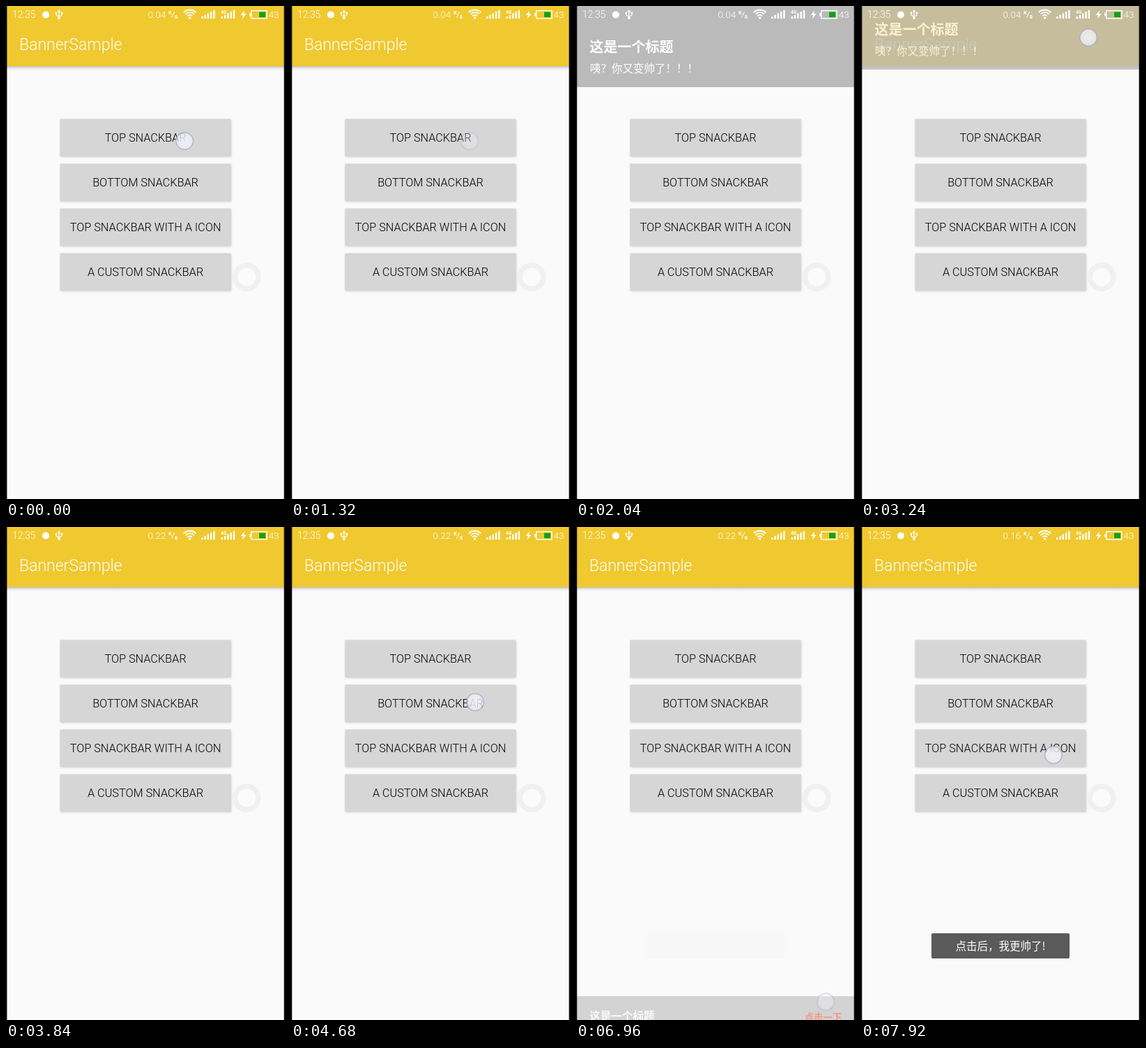
An HTML page with a canvas that plays this animation: 400x705 px, repeating every 8000 ms.

```html
<!DOCTYPE html>
<html lang="zh-CN">
<head>
<meta charset="utf-8">
<style>
html, body { margin: 0; width: 100%; height: 100%; overflow: hidden; background: #fafafa; }
canvas { display: block; }
</style>
</head>
<body>
<canvas id="stage" width="400" height="705"></canvas>
<script>
const W = 400, H = 705, LOOP = 8000, STEP = 120;
const LATIN = 'Roboto, "Noto Sans", sans-serif';
const HAN = '"Noto Sans CJK SC", "Noto Sans CJK", sans-serif';
const WHITE = '#fff', YELLOW = '#f0c82f', GREY = '#bababa';
const ctx = document.getElementById('stage').getContext('2d');

const BUTTONS = ['TOP SNACKBAR', 'BOTTOM SNACKBAR', 'TOP SNACKBAR WITH A ICON', 'A CUSTOM SNACKBAR'];
const BTN = { x: 77.5, y: 161.5, w: 245, h: 53.5, pitch: 64 };

// Shown and hidden with the same eased slide and fade.
const SLIDE = 690;
const TOP_BAR = { show: 1320, hide: 3074, image: makeTopBar() };
const BOTTOM_BAR = { show: 5040, hide: 6746, image: makeBottomBar() };

const TOUCHES = [
  { x: 256, y: 193, from: -1, to: 1180, fade: 240 },
  { x: 326, y: 45, from: 3000, to: 3260, fade: 220 },
  { x: 264, y: 250.5, from: 4560, to: 4800, fade: 240 },
  { x: 358, y: 679, from: 6720, to: 6840, fade: 240 },
  { x: 276, y: 326, from: 7800, to: LOOP, fade: 240 }
];
const RIPPLES = [
  { button: 0, x: 256, y: 193, start: 1320 },
  { button: 1, x: 264, y: 250, start: 5040 }
];

const ramp = (t, a, b) => Math.min(1, Math.max(0, (t - a) / (b - a)));
const smooth = p => p * p * (3 - 2 * p);

// Cubic Bezier (0.4, 0, 0.2, 1), solved by bisection.
function fastOutSlowIn(p) {
  let lo = 0, hi = 1;
  for (let i = 0; i < 20; i++) {
    const s = (lo + hi) / 2, r = 1 - s;
    if (1.2 * r * r * s + 0.6 * r * s * s + s ** 3 < p) lo = s; else hi = s;
  }
  return lo * lo * (3 - 2 * lo);
}

function text(c, str, x, y, size, { weight = 300, color = WHITE, family = LATIN, align = 'left' } = {}) {
  c.font = `${weight} ${size}px ${family}`;
  c.textAlign = align;
  c.textBaseline = 'alphabetic';
  c.fillStyle = color;
  c.fillText(str, x, y);
}

function rect(c, x, y, w, h, color) {
  c.fillStyle = color;
  c.fillRect(x, y, w, h);
}

function circle(x, y, r, fill) {
  ctx.beginPath();
  ctx.arc(x, y, r, 0, Math.PI * 2);
  ctx.fillStyle = fill;
  ctx.fill();
}

function poly(points, close) {
  ctx.beginPath();
  points.forEach(([x, y]) => ctx.lineTo(x, y));
  if (close) ctx.closePath();
}

function makeLayer(height) {
  const layer = document.createElement('canvas');
  layer.width = W;
  layer.height = height;
  const c = layer.getContext('2d');
  rect(c, 0, 0, W, height, GREY);
  return [layer, c];
}

function makeTopBar() {
  const [layer, c] = makeLayer(116);
  text(c, '这是一个标题', 19.5, 65.5, 20, { weight: 700, family: HAN });
  text(c, '咦？你又变帅了！！！', 20, 94.5, 15.5, { family: HAN });
  return layer;
}

function makeBottomBar() {
  const [layer, c] = makeLayer(56);
  text(c, '这是一个标题', 19.5, 34, 15.5, { weight: 700, family: HAN });
  text(c, '点击一下', 381, 34.5, 13.3, { weight: 700, family: HAN, color: '#f9513d', align: 'right' });
  return layer;
}

function drawPage() {
  rect(ctx, 0, 0, W, H, '#fafafa');
  const shade = ctx.createLinearGradient(0, 86, 0, 92);
  shade.addColorStop(0, 'rgba(0,0,0,.25)');
  shade.addColorStop(0.4, 'rgba(0,0,0,.09)');
  shade.addColorStop(1, 'rgba(0,0,0,0)');
  rect(ctx, 0, 86, W, 6, shade);
  rect(ctx, 0, 0, W, 86, YELLOW);
  text(ctx, 'BannerSample', 19, 63, 23);
}

function drawButtons(t) {
  BUTTONS.forEach((label, i) => {
    const y = BTN.y + i * BTN.pitch;
    ctx.save();
    ctx.shadowColor = 'rgba(0,0,0,.24)';
    ctx.shadowBlur = 3;
    ctx.shadowOffsetY = 1;
    rect(ctx, BTN.x, y, BTN.w, BTN.h, '#d6d6d6');
    ctx.restore();
    RIPPLES.filter(r => r.button === i).forEach(r => drawRipple(r, y, t));
    text(ctx, label, W / 2, y + 32.2, 16.25, { color: '#000', align: 'center' });
  });
}

function drawRipple(r, top, t) {
  const p = ramp(t, r.start, r.start + 600);
  if (p === 0 || p === 1) return;
  const move = p ** 2.4;
  ctx.save();
  ctx.beginPath();
  ctx.rect(BTN.x, top, BTN.w, BTN.h);
  ctx.clip();
  ctx.globalAlpha = 1 - ramp(p, 0.7, 1);
  circle(r.x + (W / 2 - r.x) * move, r.y + (top + BTN.h / 2 - r.y) * move, 124 * p, 'rgba(0,0,0,.05)');
  ctx.restore();
}

function drawBar(bar, t, fromTop) {
  const shown = fastOutSlowIn(ramp(t, bar.show, bar.show + SLIDE)) -
                fastOutSlowIn(ramp(t, bar.hide, bar.hide + SLIDE));
  if (shown <= 0) return;
  const h = bar.image.height;
  ctx.globalAlpha = shown;
  ctx.drawImage(bar.image, 0, fromTop ? -h * (1 - shown) : H - h * shown);
  ctx.globalAlpha = 1;
}

function drawToast(t) {
  ctx.globalAlpha = smooth(ramp(t, 6930, 7350));
  ctx.beginPath();
  ctx.roundRect(101, 581, 198, 36, 2);
  ctx.fillStyle = '#5a5a5a';
  ctx.fill();
  text(ctx, '点击后，我更帅了!', 200, 604.5, 15.5, { family: HAN, align: 'center' });
  ctx.globalAlpha = 1;
}

function drawFloatingRing() {
  circle(345, 387.5, 20.5, '#f0f0f0');
  circle(345, 387.5, 13, '#fbfbfb');
}

function drawTouch({ x, y, from, to, fade }, t) {
  if (t < from || t >= to + fade) return;
  ctx.globalAlpha = 1 - ramp(t, to, to + fade);
  const glow = ctx.createRadialGradient(x, y, 2, x, y, 13.5);
  glow.addColorStop(0, 'rgba(242,243,248,.85)');
  glow.addColorStop(0.76, 'rgba(240,241,248,.75)');
  glow.addColorStop(0.9, 'rgba(158,160,198,.8)');
  glow.addColorStop(1, 'rgba(190,190,210,.1)');
  circle(x, y, 13.5, glow);
  ctx.globalAlpha = 1;
}

function drawSignal(x) {
  for (let i = 0; i < 5; i++) {
    const h = 3 + i * 2.3;
    rect(ctx, x + i * 4.3, 18 - h, 2.4, h, WHITE);
  }
}

function drawUsb() {
  ctx.lineWidth = 1.3;
  poly([[76, 8], [76, 17]]);
  ctx.stroke();
  poly([[72, 10], [72, 13], [76, 15.5], [80, 13], [80, 10]]);
  ctx.stroke();
  circle(76, 17.3, 1.8, WHITE);
  circle(72, 10, 1.4, WHITE);
  rect(ctx, 78.7, 8.7, 2.6, 2.6, WHITE);
  poly([[73.7, 8.5], [76, 5], [78.3, 8.5]], true);
  ctx.fill();
}

function drawWifi() {
  ctx.lineWidth = 1.8;
  [4.5, 8.3, 12].forEach(r => {
    ctx.beginPath();
    ctx.arc(263.5, 17.5, r, -Math.PI * 0.76, -Math.PI * 0.24);
    ctx.stroke();
  });
  circle(263.5, 17, 1.8, WHITE);
}

function drawBattery() {
  ctx.lineWidth = 1.4;
  ctx.strokeRect(351.7, 6.7, 22.3, 11);
  rect(ctx, 349, 10, 2.5, 4.5, WHITE);
  rect(ctx, 363, 8.5, 9, 7.6, '#12a212');
  poly([[342, 6.5], [336.5, 13], [340, 13], [338.5, 18.5], [344.5, 11.3], [341, 11.3]], true);
  ctx.fillStyle = WHITE;
  ctx.fill();
}

function drawStatus(t) {
  ctx.strokeStyle = WHITE;
  text(ctx, '12:35', 9, 17, 13.8);
  circle(57, 12.5, 5, WHITE);
  drawUsb();
  const speed = t < 3840 ? '0.04' : t < 7560 ? '0.22' : '0.16';
  text(ctx, speed, 203.5, 17, 13.5);
  text(ctx, 'K', 233, 12, 7.5, { weight: 700 });
  text(ctx, 's', 241.5, 17.5, 9, { weight: 700 });
  ctx.lineWidth = 1;
  poly([[237.5, 16.5], [241.5, 8]]);
  ctx.stroke();
  drawWifi();
  drawSignal(280);
  drawSignal(308.5);
  text(ctx, '4G', 308, 11, 6.5, { weight: 700 });
  drawBattery();
  text(ctx, '43', 376.5, 17, 13.5);
}

function draw(t) {
  drawPage();
  drawButtons(t);
  drawBar(TOP_BAR, t, true);
  drawBar(BOTTOM_BAR, t, false);
  drawToast(t);
  drawFloatingRing();
  drawStatus(t);
  TOUCHES.forEach(touch => drawTouch(touch, t));
  rect(ctx, 0, 0, 1.4, H, '#000');
  rect(ctx, 398.6, 0, 1.4, H, '#000');
}

const begin = performance.now();
function tick() {
  const t = (performance.now() - begin) % LOOP;
  draw(Math.floor(t / STEP) * STEP);
  requestAnimationFrame(tick);
}
tick();
</script>
</body>
</html>
```
